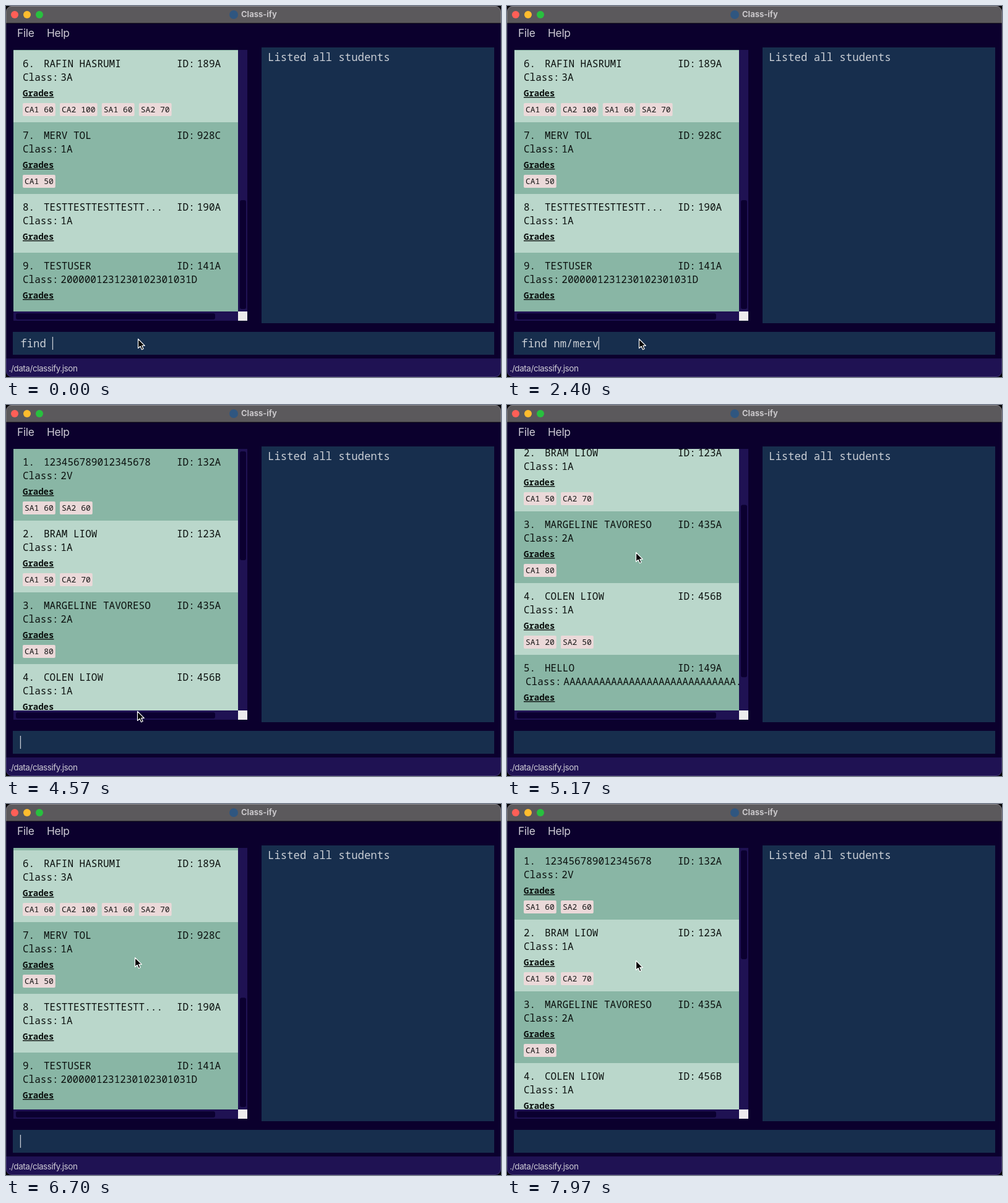
Animation of 800 by 600 pixels, one loop 8000 ms. Source, as an HTML page:

```html
<!DOCTYPE html>
<html lang="en">
<head>
<meta charset="utf-8">
<title>Student list</title>
<style>
  html, body { margin: 0; width: 100%; height: 100%; overflow: hidden; background: #000; }
  svg { display: block; width: 800px; height: 600px; border-radius: 9px; }
  text { white-space: pre; }
  .ui { font-family: Inter, sans-serif; fill: #cfcdd6; }
  .mono { font-family: "Noto Sans Mono", "Liberation Mono", monospace; }
  .console { font-size: 17.33px; font-weight: 300; fill: #c9ced5; }
  .field { font-size: 16px; font-weight: 500; fill: #0a0f0d; }
  .grades { font-size: 14px; font-weight: 700; fill: #0a0f0d; text-decoration: underline; }
  .tag { font-size: 13px; fill: #151515; }
  .panel { fill: #172e4d; }
  .track { fill: #1f1253; }
  .thumb { fill: #0b0030; }
</style>
</head>
<body>
<svg id="stage" viewBox="0 0 800 600">
  <defs>
    <clipPath id="listClip"><rect id="listWindow" x="12" y="71" height="423"/></clipPath>
  </defs>
  <rect width="800" height="600" fill="#0b002d"/>

  <rect width="800" height="28" fill="#5b595c"/>
  <rect width="800" height="1" fill="#777579"/>
  <rect y="27.5" width="800" height="1" fill="#08040f"/>
  <circle cx="14" cy="14" r="6" fill="#ff5f57"/>
  <circle cx="34" cy="14" r="6" fill="#febc2e"/>
  <circle cx="54" cy="14" r="6" fill="#28c03f"/>
  <circle cx="368" cy="14" r="7" fill="#2f5680"/>
  <text class="ui" x="380" y="18" font-size="13" font-weight="700" style="fill:#c9c7ca">Class-ify</text>

  <text class="ui" x="18" y="50" font-size="17.33" letter-spacing="-.3">File</text>
  <text class="ui" x="66" y="50" font-size="17.33" letter-spacing="-.3">Help</text>

  <g clip-path="url(#listClip)">
    <g id="allCards"></g>
    <g id="foundCards"></g>
  </g>
  <rect class="track" x="12" y="494" width="378" height="15"/>
  <rect class="thumb" id="hThumb" x="16" y="497" height="10" rx="3"/>
  <g id="vBar">
    <rect class="track" x="375" y="71" width="15" height="423"/>
    <rect class="thumb" id="vThumb" x="378" width="10" rx="3"/>
    <rect x="375" y="494" width="15" height="15" fill="#ececec"/>
  </g>

  <rect class="panel" x="413" y="67" width="376" height="446"/>
  <text class="mono console" id="result" x="423" y="89"></text>

  <rect class="panel" x="11" y="527" width="778" height="37"/>
  <text class="mono console" id="command" x="23.3" y="552"></text>
  <rect id="caret" y="535" width="1.3" height="21" fill="#c9ced5"/>

  <rect class="track" y="570" width="800" height="30"/>
  <text class="ui" x="4.5" y="591" font-size="13.5" letter-spacing="-.45">./data/classify.json</text>

  <path id="pointer" d="M0 0V15L3.6 11.8L6 17.2L8.6 16L6.2 10.8H10.8Z"
        fill="#000" stroke="#fff" stroke-width="1.2" stroke-linejoin="round"/>
  <rect x=".5" y=".5" width="799" height="599" rx="9" fill="none" stroke="#fff" stroke-opacity=".16"/>
</svg>

<script>
const LOOP = 8000;
const SEARCH = 2800;
const LIST_ALL = 4320;
const BOTTOM = 558;
const $ = id => document.getElementById(id);

const students = [
  ["123456789012345678", "132A", "2V", "SA1 60,SA2 60"],
  ["BRAM LIOW", "123A", "1A", "CA1 50,CA2 70"],
  ["MARGELINE TAVORESO", "435A", "2A", "CA1 80"],
  ["COLEN LIOW", "456B", "1A", "SA1 20,SA2 50"],
  ["HELLO", "149A", "A".repeat(29) + "...", ""],
  ["RAFIN HASRUMI", "189A", "3A", "CA1 60,CA2 100,SA1 60,SA2 70"],
  ["MERV TOL", "928C", "1A", "CA1 50"],
  ["TESTTESTTESTTESTT...", "190A", "1A", ""],
  ["TESTUSER", "141A", "2000001231230102301031D", ""]
];

function add(parent, name, attrs, content = "") {
  const node = document.createElementNS("http://www.w3.org/2000/svg", name);
  for (const key in attrs) node.setAttribute(key, attrs[key]);
  node.textContent = content;
  parent.appendChild(node);
}

function drawCards(parent, list) {
  let top = 71;
  list.forEach(([name, id, group, tags], i) => {
    const height = tags ? 116 : 95;
    const write = (x, dy, text, kind = "field") =>
      add(parent, "text", { x, y: top + dy, class: "mono " + kind }, text);
    add(parent, "rect", { x: 12, y: top, width: 378, height, fill: i % 2 ? "#bad7cb" : "#89b6a5" });
    write(27, 27, `${i + 1}.`);
    write(61, 27, name);
    write(276, 27, "ID:");
    write(308.7, 27, id);
    const indent = group.length > 25 ? 3 : 0;
    write(27 + indent, 49, "Class:");
    write(88.3 + indent, 49, group);
    write(27, 74, "Grades", "grades");
    let x = 27;
    for (const tag of tags ? tags.split(",") : []) {
      const width = tag.length * 7.8 + 6;
      add(parent, "rect", { x, y: top + 85, width, height: 21, rx: 2, fill: "#ebd9d9" });
      write(x + 3, 100, tag, "tag");
      x += width + 7.2;
    }
    top += height;
  });
}

drawCards($("allCards"), students);
drawCards($("foundCards"), [students[6]]);

// Each key press: time and the field's text afterwards.
const keys = [[0, "find "]];
function type(text, times) {
  let value = keys[keys.length - 1][1];
  times.forEach((time, i) => keys.push([time, value += text[i]]));
}
type("nm/", [620, 820, 1260]);
type("merv", [1720, 1870, 2030, 2180]);
keys.push([SEARCH, ""]);
type("viewAll", [3240, 3360, 3470, 3600, 3830, 4000, 4130]);
keys.push([LIST_ALL, ""]);

const easeOut = u => 1 - (1 - u) ** 3;
const smooth = u => u * u * (3 - 2 * u);
const linear = u => u;

function track(points, at, ease) {
  let [x0, y0] = points[0];
  for (const [x1, y1] of points) {
    if (at < x1) return x1 > x0 && at > x0 ? y0 + (y1 - y0) * ease((at - x0) / (x1 - x0)) : y0;
    [x0, y0] = [x1, y1];
  }
  return y0;
}

const scrollPath = [[5034, 0], [5834, 303], [6230, 303], [6830, BOTTOM], [7040, BOTTOM], [7740, 0]];
const pointerX = [[4450, 213], [4960, 208]];
const pointerY = [[4450, 538], [4960, 238], [5250, 238], [6000, 248], [7000, 248], [7800, 253]];
const thumbTop = [[0, 75], [130, 161], [303, 249], [BOTTOM, 314]];
const thumbEnd = [[0, 251], [130, 440], [303, 490], [BOTTOM, 490]];

function render(t) {
  const filtered = t >= SEARCH && t < LIST_ALL;
  const scroll = t < SEARCH ? BOTTOM : Math.round(track(scrollPath, t, easeOut));
  const set = (id, name, value) => $(id).setAttribute(name, value);
  const show = (id, on) => set(id, "visibility", on ? "visible" : "hidden");

  show("allCards", !filtered);
  show("foundCards", filtered);
  show("vBar", !filtered);
  set("allCards", "transform", `translate(0 ${-scroll})`);
  set("listWindow", "width", filtered ? 378 : 363);
  set("hThumb", "width", filtered ? 350 : 322);
  const top = track(thumbTop, scroll, linear);
  set("vThumb", "y", top);
  set("vThumb", "height", track(thumbEnd, scroll, linear) - top);
  $("result").textContent = filtered ? "1 student found!" : "Listed all students";

  const [pressed, value] = keys.filter(key => key[0] <= t).pop();
  $("command").textContent = value;
  set("caret", "x", 22.8 + value.length * 10.4);
  show("caret", (t - pressed) % 1000 < 500);

  const x = Math.round(track(pointerX, t, smooth));
  const y = Math.round(track(pointerY, t, smooth));
  set("pointer", "transform", `translate(${x + .5} ${y + .5})`);
}

const start = performance.now();
function frame() {
  render((performance.now() - start) % LOOP);
  requestAnimationFrame(frame);
}
frame();
</script>
</body>
</html>
```
